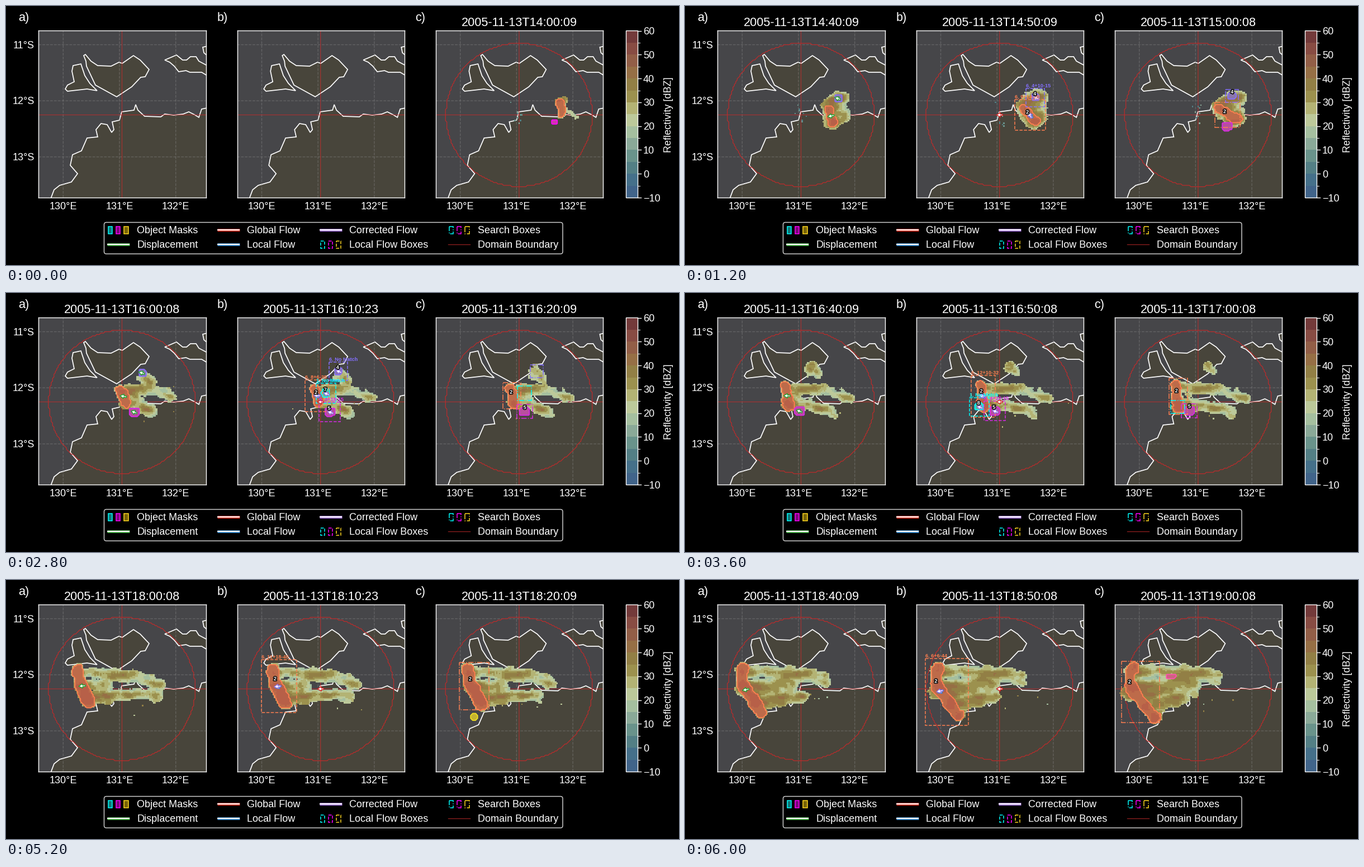
A matplotlib script that plays this animation: 1204x465 px, repeating every 6200 ms.

```python
import math

import numpy as np
import matplotlib.pyplot as plt
from matplotlib.animation import FuncAnimation
from matplotlib.colors import BoundaryNorm, ListedColormap
from matplotlib.patches import FancyArrow, FancyBboxPatch, Polygon, Rectangle
from matplotlib.patheffects import withStroke

W, H, DPI = 1204, 465, 100
STEPS = 31
PT = 72 / DPI
LEFT, TOP, SIDE, GAP = 58.3, 44.5, 299.3, 355.2
CELL = 2.5
CENTRE = (207.5, 195.5)
SEA, LAND = "#464649", "#48453b"
CORAL, VIOLET, GREEN = "#ff7f50", "#8470ff", "#20a030"
REFLECT = ["#41648a", "#45708a", "#537f85", "#69938b", "#8aa998", "#a5bf9f", "#bcc99a",
           "#b3b374", "#9c914e", "#927f45", "#966f45", "#925e47", "#884c43", "#733a3a"]

plt.rcParams["font.family"] = "Liberation Sans"
plt.rcParams["text.color"] = "white"

# Coast corners, in the pixels of the first panel
MAINLAND = [(360, 183), (350, 185), (345, 200), (337, 195), (327, 190), (317, 194), (300, 196),
            (284, 194), (277, 199), (248, 198), (236, 187), (232, 177), (229, 187), (207, 190),
            (203, 205), (190, 208), (193, 222), (189, 227), (181, 213), (170, 211), (161, 222),
            (164, 235), (145, 237), (135, 260), (119, 267), (115, 286), (128, 301), (117, 316),
            (96, 322), (86, 330), (80, 346), (360, 346)]
EAST_ISLE = [(139, 89), (142, 87), (152, 99), (164, 107), (188, 108), (202, 101), (208, 103),
             (228, 89), (240, 97), (256, 114), (249, 127), (241, 128), (225, 145), (198, 163),
             (160, 142), (144, 108), (143, 99)]
WEST_ISLE = [(120, 107), (134, 104), (141, 125), (150, 139), (163, 152), (145, 149), (110, 153),
             (106, 149), (110, 142), (122, 136), (118, 117)]
CAPE = [(284, 97), (305, 88), (316, 97), (323, 97), (330, 91), (340, 91), (345, 99), (360, 107),
        (360, 125), (350, 119), (329, 119), (322, 116), (309, 118), (301, 108), (293, 101)]
CORNER = [(360, 72), (352, 74), (354, 84), (360, 89)]

# Main cell as a bent stroke, by step: top x, y, bottom x, y, bend, half width
SPINE = {0: (281, 176, 283, 194, 3, 7), 4: (258, 187, 264, 208, 0, 8),
         6: (245, 186, 279, 202, 0, 8), 13: (197, 174, 205, 194, 0, 9),
         18: (167, 165, 173, 205, 0, 9), 26: (117, 160, 140, 224, -4, 10),
         30: (93, 158, 130, 246, -20, 9)}
# Rain bands trail from a point on that stroke to a tail, by step: x, y, half width
BANDS = [
    (0.1, {0: (286, 182, 8), 5: (275, 165, 17), 13: (296, 187, 9), 22: (286, 191, 10),
           30: (236, 176, 14)}),
    (0.5, {0: (284, 190, 0), 5: (275, 180, 18), 13: (225, 188, 9), 18: (190, 185, 4),
           26: (180, 195, 13), 30: (196, 188, 20)}),
    (0.9, {0: (308, 198, 5), 5: (276, 195, 18), 13: (258, 217, 11), 24: (270, 207, 11),
           30: (180, 210, 12)}),
]
REMNANT = {6: (270, 162, 8), 12: (251, 154, 12), 16: (231, 140, 12), 22: (230, 131, 0)}
# Small cells: number, colour, first and last step, first and last place, size
TRACKS = [
    (3, "magenta", 0, 2, (271, 209), (265, 212), (12, 8)),
    (4, VIOLET, 4, 13, (274, 166), (239, 140), (13, 13)),
    (5, "#d828e8", 6, 18, (259, 216), (192, 211), (18, 15)),
    (7, "cyan", 13, 13, (217, 180), (217, 180), (15, 16)),
    (8, "cyan", 17, 17, (171, 204), (171, 204), (15, 13)),
    (9, "#ffc020", 19, 20, (152, 218), (147, 219), (8, 7)),
    (10, "#30e030", 22, 22, (205, 213), (205, 213), (8, 5)),
    (11, "#f0e020", 26, 26, (127, 246), (127, 246), (11, 12)),
    (12, "#ff50b0", 30, 30, (159, 173), (159, 173), (18, 7)),
]

xs = LEFT + CELL * (np.arange(120) + 0.5)
ys = TOP + CELL * (np.arange(120) + 0.5)
GX, GY = np.meshgrid(xs, ys)


def between(table, n):
    """Linear value of a {step: row} table at step n."""
    steps = sorted(table)
    return np.array([np.interp(n, steps, col) for col in zip(*(table[s] for s in steps))])


def noise(seed, along, across):
    """Smooth random field, blurred more along x than along y."""
    a = np.random.default_rng(seed).standard_normal((120, 120))
    for axis, passes in ((1, along), (0, across)):
        for _ in range(passes):
            a = (np.roll(a, 1, axis) + a + np.roll(a, -1, axis)) / 3
    return a / a.std()


COARSE, FINE = noise(4, 16, 6), noise(9, 2, 1)


# ---- storm ----
def spine(n, t):
    """Point at fraction t of the main cell's stroke."""
    x0, y0, x1, y1, bend, _ = between(SPINE, n)
    return x0 + t * (x1 - x0) + bend * np.sin(np.pi * t ** 0.75), y0 + t * (y1 - y0)


def stroke_depth(px, py, half):
    """Depth inside a round stroke through the points, negative outside."""
    return half - np.min([np.hypot(GX - x, GY - y) for x, y in zip(px, py)], axis=0)


def band_depth(n, root, tail):
    x0, y0 = spine(n, root)
    x1, y1, half = between(tail, n)
    t = np.linspace(0, 1, 30)
    return stroke_depth(x0 + t * (x1 - x0), y0 + t * (y1 - y0) - 6 * np.sin(np.pi * t), half)


def alive(track, n):
    return track[2] <= n <= track[3]


def track_cell(track, n):
    """Centre and size of a small cell at step n."""
    _, _, first, last, start, end, size = track
    f = ((n - first) / max(last - first, 1)) ** 1.2
    return (*(a + f * (b - a) for a, b in zip(start, end)), *size)


def cell_mask(cell):
    x, y, w, h = cell
    return (2 * (GX - x) / w) ** 4 + (2 * (GY - y) / h) ** 4 < 1


def add_specks(dbz, n):
    rng = np.random.default_rng(n + 1)
    early = n < 11
    mean, spread = ((208, 195), (6, 12)) if early else ((245, 212), (30, 14))
    for _ in range(9 if early else 4):
        x, y = rng.normal(mean, spread)
        i, j = int((x - LEFT) / CELL), int((y - TOP) / CELL)
        if np.isnan(dbz[j, i]):
            dbz[j, i] = rng.uniform(0, 15) if early else rng.uniform(18, 38)


def radar(n):
    """Reflectivity grid and main cell mask at step n."""
    drift, rough = np.roll(COARSE, -n, 1), np.roll(FINE, -n, 1)
    t = np.linspace(0, 1, 30)
    core = stroke_depth(*spine(n, t), between(SPINE, n)[5]) + 1.2 * drift + 0.7 * rough
    wet = np.max([band_depth(n, root, tail) for root, tail in BANDS], axis=0)
    if 6 <= n < 22:
        x, y, half = between(REMNANT, n)
        wet = np.maximum(wet, stroke_depth([x - 4, x + 4], [y - 2, y + 2], half))
    wet = np.maximum(wet + 1.8 * drift + 1.2 * rough, core + 2)
    dbz = 19 + 1.1 * np.clip(wet, 0, 13) + 3 * drift + 0.7 * rough
    dbz += 7 * np.exp(np.minimum(core, 0) / 14)
    hot = np.clip(46 + 0.4 * core + 2 * drift, 42, 54)
    dbz = np.where(core > 0, hot, np.clip(dbz, 8, 40))
    dbz[wet <= 0] = np.nan
    for track in TRACKS:
        if alive(track, n):
            dbz[cell_mask(track_cell(track, n))] = 36
    add_specks(dbz, n)
    return np.ma.masked_invalid(dbz), core > 0


FIELDS = [radar(n) for n in range(STEPS)]

# ---- fixed parts ----
fig = plt.figure(figsize=(W / DPI, H / DPI), dpi=DPI, facecolor="black")
stage = fig.add_axes([0, 0, 1, 1])
stage.set(xlim=(0, W), ylim=(H, 0))
stage.axis("off")


def put(x, y, text, px=18, **kw):
    return stage.text(x, y, text, fontsize=px * PT, **kw)


def box(ax, x0, y0, x1, y1, color, style="-", fill="none", width=1.5):
    return ax.add_patch(Rectangle((x0, y0), x1 - x0, y1 - y0, fc=fill, ec=color,
                                  ls=style, lw=width * PT, zorder=6))


class Panel:
    def __init__(self, i):
        off = i * GAP
        self.ax = ax = fig.add_axes([(LEFT + off) / W, 1 - (TOP + SIDE) / H, SIDE / W, SIDE / H])
        ax.set(facecolor=SEA, xticks=[], yticks=[])
        for edge in ax.spines.values():
            edge.set(color="white", lw=1.4 * PT)
        for land in (MAINLAND, EAST_ISLE, WEST_ISLE, CAPE, CORNER):
            ax.add_patch(Polygon(land, fc=LAND, ec="white", lw=1.7 * PT, zorder=1))
        for k in range(3):
            x, y = 102.3 + 100.7 * k, 69.5 + 100.7 * k
            self.cross(x, y, color="#909090", alpha=0.4, ls="--", zorder=1.5)
            put(x + off, 365, f"{130 + k}°E", ha="center")
            if i == 0:
                put(51, y + 6, f"{11 + k}°S", ha="right")
        self.cross(*CENTRE, color="#d02828", alpha=0.65, zorder=2)
        self.image = ax.imshow(np.zeros((120, 120)), cmap=ListedColormap(REFLECT),
                               norm=BoundaryNorm(np.arange(-10, 61, 5), 14),
                               extent=(LEFT, LEFT + 300, TOP + 300, TOP), aspect="auto",
                               interpolation="nearest", zorder=3)
        disc = ((GX - CENTRE[0]) / 131) ** 2 + ((GY - CENTRE[1]) / 128.5) ** 2 < 1
        self.rim = ax.contour(xs, ys, disc, levels=[0.5], colors="#c02a2a",
                              linewidths=1.2 * PT, zorder=2)
        put(22 + off, 26.5, "abc"[i] + ")", 21.6)
        self.title = put(LEFT + SIDE / 2 + off, 36, "", 21.6, ha="center")
        self.drawn = []
        self.fit()

    def fit(self):
        self.ax.set(xlim=(LEFT, LEFT + SIDE), ylim=(TOP + SIDE, TOP))

    def cross(self, x, y, **style):
        self.ax.axvline(x, lw=1.3 * PT, snap=False, **style)
        self.ax.axhline(y, lw=1.3 * PT, snap=False, **style)

    def clear(self):
        while self.drawn:
            self.drawn.pop().remove()

    def mask(self, grid, color, alpha):
        a = grid.astype(float)
        self.drawn.append(self.ax.contourf(xs, ys, a, levels=[0.5, 1.5], colors=[color],
                                           alpha=alpha, zorder=4))
        self.drawn.append(self.ax.contour(xs, ys, a, levels=[0.5], colors=[color],
                                          linewidths=1.8 * PT, zorder=5))

    def arrow(self, x, y, angle, color, size=12):
        dx, dy = size * math.cos(angle), size * math.sin(angle)
        self.drawn.append(self.ax.add_patch(FancyArrow(
            x - dx / 2, y - dy / 2, dx, dy, width=2.6, head_width=8, head_length=7,
            length_includes_head=True, fc="white", ec=color, lw=1.4 * PT, zorder=7)))

    def number(self, x, y, value):
        self.drawn.append(self.ax.text(
            x, y, str(value), fontsize=9.5 * PT, weight="bold", ha="center",
            va="center_baseline", zorder=9,
            path_effects=[withStroke(linewidth=3 * PT, foreground="black")]))

    def frame(self, corners, color, style, note=None):
        self.drawn.append(box(self.ax, *corners, color, style))
        if note:
            self.drawn.append(self.ax.text(corners[0], corners[1] - 2.5, note, color=color,
                                           fontsize=9.1 * PT, weight="bold", zorder=8))


def draw_colorbar():
    band = SIDE / len(REFLECT)
    for i, color in enumerate(REFLECT):
        stage.add_patch(Rectangle((1108.5, 344 - (i + 1) * band), 21, band, fc=color, ec="none"))
    box(stage, 1108.5, 44.5, 1129.5, 344, "white", width=1.4)
    for i in range(len(REFLECT) + 1):
        y = 344 - i * band
        stage.plot([1130, 1133.5 if i % 2 else 1136], [y, y], color="white",
                   lw=(1 if i % 2 else 1.4) * PT)
        if i % 2 == 0:
            put(1140, y + 6.5, str(5 * i - 10).replace("-", "\u2212"))
    put(1185, 195, "Reflectivity [dBZ]", rotation=90, ha="center", va="center")


def draw_handle(x, y, kind):
    """Legend sign: a dash style for three boxes, or a line colour."""
    if kind in ("-", "--", "-."):
        for k, (color, dark) in enumerate((("cyan", "#107878"), ("magenta", "#780878"),
                                           ("#ffd820", "#786408"))):
            x0 = x + 1.5 + 14.4 * k
            box(stage, x0, y - 6.5, x0 + 7.5, y + 6.5, color, kind,
                dark if kind == "-" else "none")
    elif kind == "thin":
        stage.plot([x, x + 39], [y, y], color="#902020", lw=1.3 * PT)
    else:
        for color, width in ((kind, 4.8), ("white", 2.2)):
            stage.plot([x, x + 40], [y, y], color=color, lw=width * PT, solid_capstyle="butt")


def draw_legend():
    stage.add_patch(FancyBboxPatch((175.5, 388.5), 820.5, 56.5, fc="black", ec="#cccccc",
                                   boxstyle="round,pad=0,rounding_size=4", lw=1.5 * PT))
    columns = [(181, 234, ("-", "Object Masks"), ("#40b040", "Displacement")),
               (378, 431, ("#e03020", "Global Flow"), ("#3088d0", "Local Flow")),
               (561, 614, ("#a878e0", "Corrected Flow"), ("--", "Local Flow Boxes")),
               (791, 844, ("-.", "Search Boxes"), ("thin", "Domain Boundary"))]
    for x, text_x, *rows in columns:
        for y, (kind, name) in zip((402, 428), rows):
            draw_handle(x, y, kind)
            put(text_x, y + 6, name)


panels = [Panel(i) for i in range(3)]
draw_colorbar()
draw_legend()


# ---- moving parts ----
def clock(n):
    minute = n % 6 * 10
    sec = 23 if minute == 10 else 8 if minute in (0, 50) and n >= 6 else 9
    return f"2005-11-13T{14 + n // 6}:{minute:02d}:{sec:02d}"


def heading(n):
    """Direction the main cell travels in."""
    (x0, y0), (x1, y1) = spine(n - 0.5, 0.4), spine(n + 0.5, 0.4)
    return math.atan2(y1 - y0, x1 - x0)


def main_box(n):
    mask = FIELDS[n][1]
    return np.array([GX[mask].min(), GY[mask].min(), GX[mask].max(), GY[mask].max()])


def cell_box(cell):
    x, y, w, h = cell
    return np.array([x - w / 2, y - h / 2, x + w / 2, y + h / 2])


def grow(corners, pad, dx=0, dy=0):
    return corners + (dx - pad, dy - pad, dx + pad, dy + pad)


def show_main(panel, role, n):
    panel.mask(FIELDS[n][1], CORAL, 0.4)
    (x, y), (ax, ay) = spine(n, 0.3), spine(n, 0.5)
    if role == 0:
        panel.arrow(ax, ay, heading(n), GREEN)
    elif role == 1:
        note = f"6, {4 + n % 9}+{5 + 5 * n % 16}-{15 + n}"
        panel.frame(grow(main_box(n), 10), CORAL, "--", note)
        panel.arrow(*CENTRE, math.pi, "#d02020", 11)
        panel.arrow(ax + 1.5, ay + 1, heading(n) - 0.25, "#3080d0", 11)
        panel.arrow(ax, ay, heading(n), "#9070e0")
    elif n:
        panel.frame(grow(main_box(n - 1), 5, x - spine(n - 1, 0.3)[0]), CORAL, "-.")
    if role == 1 or role == 2 and n:
        panel.number(x, y - 2, 2)


def show_track(panel, role, n, track):
    ident, color, _, last, *_ = track
    here, before = alive(track, n), alive(track, n - 1)
    cell = track_cell(track, n) if here else None
    if here:
        x, y = cell[:2]
        panel.mask(cell_mask(cell), color, 0.55)
    if here and role == 0 and n < last:
        panel.arrow(x - 1, y, math.pi + 0.35, GREEN, 11)
    elif here and role == 1:
        lead = 1 if color == "cyan" else 6
        note = f"{lead}, No Match" if n == last else f"{lead}, 4+{5 + n}-15"
        panel.frame(grow(cell_box(cell), 10), color, "--", note)
        panel.arrow(x + 1, y + 1, math.pi + 0.35, "#9070e0", 11)
        panel.number(x - 1, y - 7, ident)
    elif role == 2 and before:
        old = track_cell(track, n - 1)
        panel.frame(grow(cell_box(cell if here else old), 5), color, "-.")
        if here:
            panel.number(x, y - 8, ident)


def draw(i):
    for role, panel in enumerate(panels):
        n = i - 2 + role
        shown = n >= 0
        panel.clear()
        panel.image.set_visible(shown)
        panel.rim.set_visible(shown)
        panel.title.set_text(clock(n) if shown else "")
        if shown:
            panel.image.set_data(FIELDS[n][0])
            show_main(panel, role, n)
            for track in TRACKS:
                show_track(panel, role, n, track)
            panel.fit()
    return []


anim = FuncAnimation(fig, draw, frames=STEPS, interval=200, repeat=True, blit=False)
plt.show()
```
